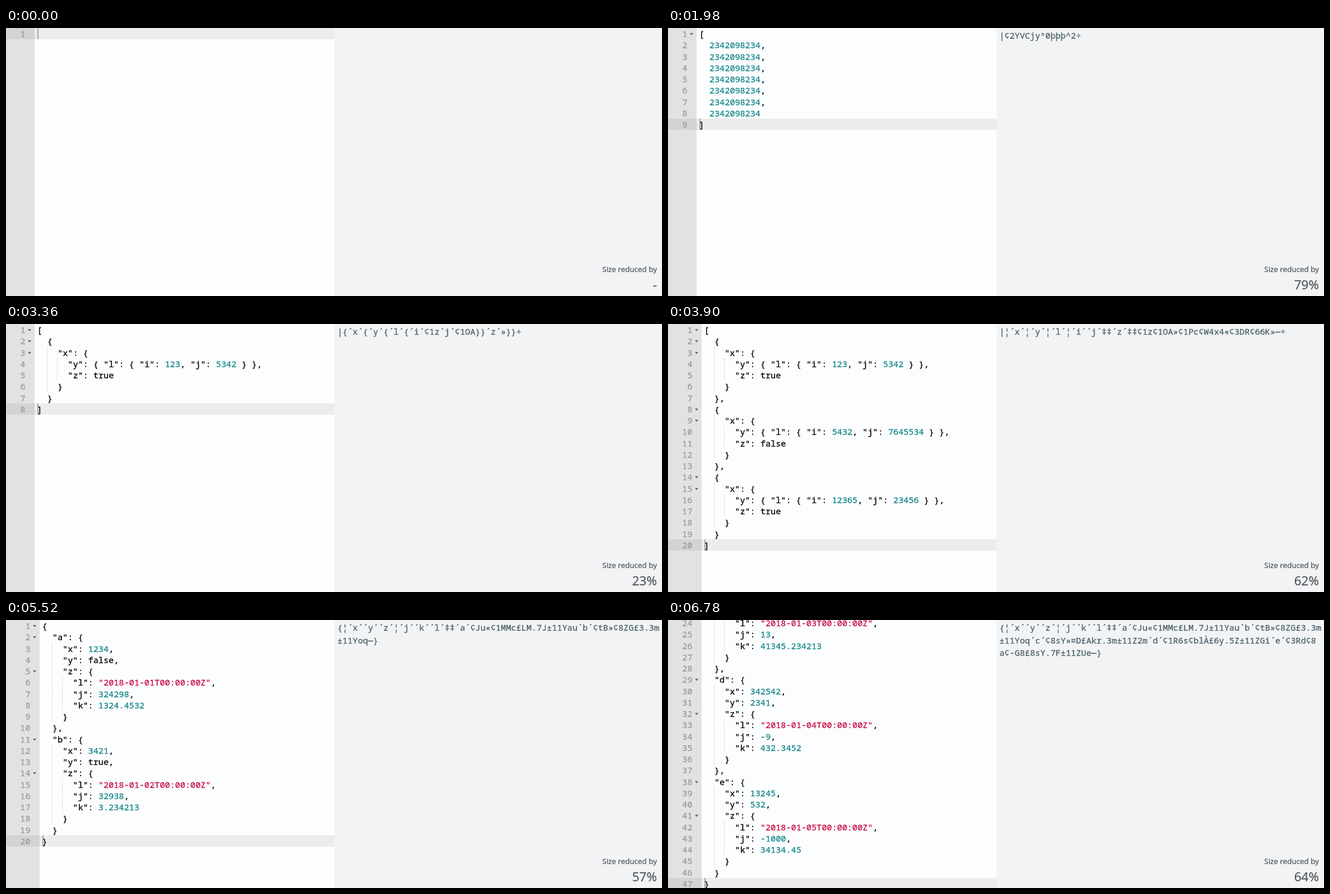
An HTML page for the animation above (6840 ms loop, 1170 by 479 pixels).

```html
<!DOCTYPE html>
<html lang="en">
<head>
<meta charset="utf-8">
<title>JSON compression demo</title>
<style>
  html, body { margin: 0; width: 100%; height: 100%; overflow: hidden; background: #f2f3f4; }
  #stage { position: relative; width: 1170px; height: 479px; overflow: hidden; -webkit-text-stroke: .3px; }
  #stage div, #stage i { position: absolute; }
  #text, #out { font: 500 15.2px/20.26px "Noto Sans Mono", monospace; }
  #editor { left: 0; top: 0; width: 586px; height: 479px; overflow: hidden; background: #fcfdff; color: #000; }
  #text { left: 0; top: 0; white-space: pre; }
  #gutter { left: 0; top: 0; height: 479px; background: #e1e3e3; }
  #active { left: 0; width: 586px; height: 20.26px; background: rgba(0, 0, 0, .065); }
  #caret { width: 2px; height: 20.26px; background: #a2a4a5; }
  #bar { left: 575px; width: 9px; border-radius: 5px; background: #757674; }
  .no { left: 0; text-align: right; color: #979a9b; }
  .fold { border: 3.5px solid transparent; border-top: 4px solid #666a6a; border-bottom: 0; }
  .guide { width: 0; height: 20.26px; border-left: 1px dotted #c6c8c9; }
  .num { color: #118587; }
  .str { color: #c80a3f; }
  #out { left: 591px; top: 1.8px; width: 579px; line-height: 22.8px; word-break: break-all; color: #4b606a; }
  #label, #size { right: 9px; font-family: "Open Sans", sans-serif; color: #50565b; white-space: nowrap; }
  #label { top: 421px; font-size: 13.4px; line-height: 20px; }
  #size { top: 443.5px; font-size: 22.5px; line-height: 30px; }
</style>
</head>
<body>
<div id="stage">
  <div id="editor">
    <div id="gutter"></div>
    <div id="active"></div>
    <div id="caret"></div>
    <div id="text"></div>
    <div id="bar"></div>
  </div>
  <div id="out"></div>
  <div id="label">Size reduced by</div>
  <div id="size">-</div>
</div>
<script>
const LOOP = 6840, STEP = 60, ROW = 20.26, CHAR = 9.12, LAST_TOP = 461;
const el = id => document.getElementById(id);
const indent = lines => lines.map(s => '  ' + s);

const point = (i, j, z) => indent([
  '{', '  "x": {',
  `    "y": { "l": { "i": ${i}, "j": ${j} } },`,
  `    "z": ${z}`,
  '  }', '}'
]);

const record = (key, x, y, day, j, k) => indent([
  `"${key}": {`, `  "x": ${x},`, `  "y": ${y},`, '  "z": {',
  `    "l": "2018-01-0${day}T00:00:00Z",`, `    "j": ${j},`, `    "k": ${k}`,
  '  }', '}'
]);

const points = [
  point(123, 5342, true), point(5432, 7645534, false), point(12365, 23456, true),
  point(6543, 6542, true), point(2346, 12356, false), point(56324, 5432, 24)
];
const pointCodes = ['¢1z¢1OA»', '¢1Pc¢W4x4«', '¢3DR¢66K»', '¢1hX¢1hW»', '¢bq¢3DI«', '¢EeSº2¤O'];

const records = [
  record('a', 1234, false, 1, 324298, 1324.4532),
  record('b', 3421, true, 2, 32938, 3.234213),
  record('c', 34134, true, 3, 13, 41345.234213),
  record('d', 342542, 2341, 4, -9, 432.3452),
  record('e', 13245, 532, 5, -1000, 34134.45)
];
const recordCodes = [
  '´a´¢Ju«¢1MMc£LM.7J±11Yau', '´b´¢tB»¢8ZG£3.3m±11Yoq', '´c´¢8sY»¤D£Akr.3m±11Z2m',
  '´d´¢1R6s¢blÀ£6y.5Z±11ZGi', '´e´¢3Rd¢8a¢-G8£8sY.7F±11ZUe'
];

const packNumbers = n => {
  const rest = n - 2;
  const repeat = rest > 3 ? 'þþþ^' + (rest - 3) : 'þ'.repeat(Math.max(0, rest));
  return '|¢2YVCjy' + (n > 1 ? 'º0' : '') + repeat + '÷';
};
const packPoints = n => n < 2
  ? '|{´x´{´y´{´l´{´i´¢1z´j´¢1OA}}´z´»}}÷'
  : '|¦´x´¦´y´¦´l´¦´i´´j´‡‡´z´‡‡' + pointCodes.slice(0, n).join('') + '—÷';
const packRecords = n => n < 2
  ? '{´a´{´x´¢Ju´y´«´z´{´j´¢1MMc´k´£LM.7J´l´±11Yau}}}'
  : '{¦´x´´y´´z´¦´j´´k´´l´‡‡' + recordCodes.slice(0, n).join('') + '—}';

// Each scene adds one item every `gap` ms, beginning with `first` items.
const scenes = [
  { at: 1380, gap: 90, ends: '[]', items: Array(7).fill(['  2342098234']), pack: packNumbers },
  { at: 2520, gap: 960, ends: '[]', items: points.slice(0, 1), pack: packPoints },
  { at: 3480, gap: 240, first: 2, ends: '[]', items: points, pack: packPoints },
  { at: 5160, gap: 270, ends: '{}', items: records, pack: packRecords }
];

function intro(t) {
  const full = '[1, 2, 3]';
  const text = t < STEP ? '' : full.slice(0, Math.floor(t / STEP) + 1);
  return { lines: [text], col: t < 840 ? text.length : 0, out: text === full ? '|ÊËÌ÷' : '', age: t };
}

function stateAt(t) {
  const scene = scenes.filter(s => t >= s.at).pop();
  if (!scene) return intro(t);
  const first = scene.first || 1;
  const n = Math.min(scene.items.length, first + Math.floor((t - scene.at) / scene.gap));
  const body = scene.items.slice(0, n).map(lines => lines.join('\n')).join(',\n');
  return {
    lines: [scene.ends[0], ...body.split('\n'), scene.ends[1]],
    col: 0,
    out: scene.pack(n),
    age: t - scene.at - (n - first) * scene.gap
  };
}

const paint = s => s.replace(/("[^"]*")(:?)|-?\d[\d.]*/g, (m, str, colon) =>
  colon ? m : `<span class="${str ? 'str' : 'num'}">${m}</span>`);

function lineHtml(s, i, top, gutter) {
  const left = gutter + 5;
  let html = `<div class="no" style="top:${top}px;width:${gutter - 16}px">${i + 1}</div>`;
  if (/[{[][^}\]]*$/.test(s))
    html += `<i class="fold" style="left:${gutter - 12}px;top:${top + 9}px"></i>`;
  for (let c = 2; c < s.search(/\S|$/); c += 2)
    html += `<i class="guide" style="left:${left + c * CHAR - 1}px;top:${top}px"></i>`;
  return html + `<div style="left:${left}px;top:${top}px">${paint(s)}</div>`;
}

function place(id, style) { Object.assign(el(id).style, style); }

function render({ lines, col, out, age }) {
  const count = lines.length;
  const gutter = count > 9 ? 59.6 : 50.6;
  const lastTop = (count - 1) * ROW;
  const scroll = Math.max(0, lastTop - LAST_TOP);
  const top = lastTop - scroll + 'px';

  place('gutter', { width: gutter + 'px' });
  place('active', { top });
  place('caret', { top, left: gutter + 5 + col * CHAR + 'px' });
  el('text').innerHTML = lines.map((s, i) => lineHtml(s, i, i * ROW - scroll, gutter)).join('');

  const thumb = 479 * 479 / (count * ROW);
  place('bar', {
    top: 479 - thumb + 'px',
    height: thumb + 'px',
    opacity: scroll ? Math.max(0, Math.min(1, 1 - (age - 360) / 180)) : 0
  });

  const json = lines.join('').replace(/\s/g, '');
  el('out').textContent = out;
  el('size').textContent = out ? Math.round(100 * (1 - out.length / json.length)) + '%' : '-';
}

let shown = -1;
function tick() {
  const t = Math.floor(performance.now() % LOOP / STEP) * STEP;
  if (t !== shown) render(stateAt(shown = t));
  requestAnimationFrame(tick);
}
tick();
</script>
</body>
</html>
```
